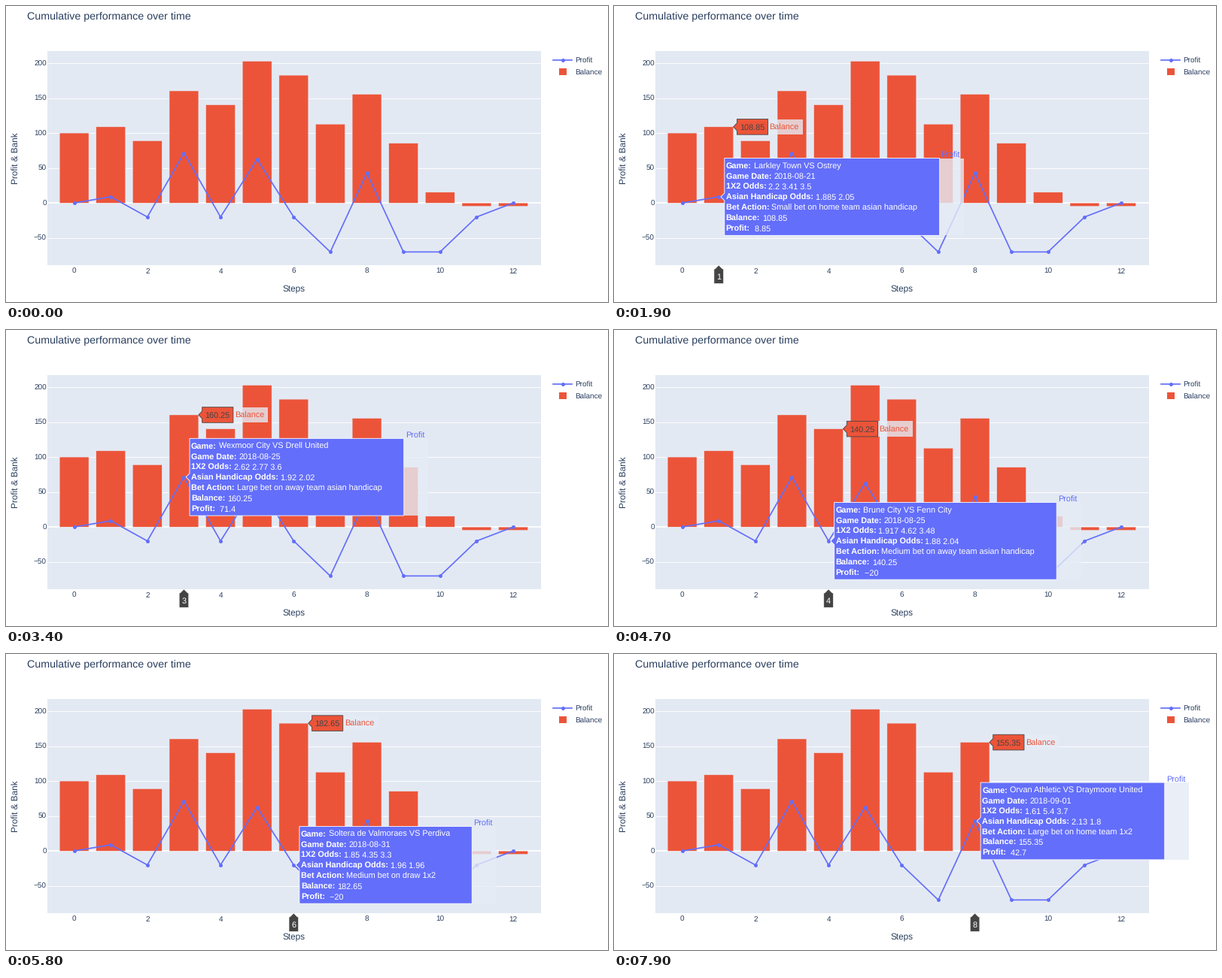
Write a matplotlib script that moves like this. It is 800x394 px and loops after 8 s.

```python
import numpy as np
import matplotlib.pyplot as plt
from matplotlib.animation import FuncAnimation
from matplotlib.patches import Polygon, Rectangle

plt.rcParams["font.family"] = "Liberation Sans"
plt.rcParams["text.hinting"] = "none"

W, H, DPI = 800, 394, 100
FRAMES, INTERVAL = 80, 100

INK, PLOT_BG = "#2a3f5f", "#e3e9f3"
RED, BLUE, DARK = "#ec5439", "#636efa", "#444444"
TICK, AXIS, HOVER, TITLE = 10.0, 11.7, 10.86, 14.2  # font sizes in pixels
LINE_STEP = 13.9

profit = np.array([0, 8.85, -20, 71.4, -20, 62.4, -20, -70, 42.7, -70, -70, -20, 0])
balance = np.round(100 + np.cumsum(profit), 2)

# game, date, 1X2 odds, asian handicap odds, bet action
BETS = [
    (" VS", "", "", " ", ""),
    ("Larkley Town VS Ostrey", "2018-08-21", "2.2 3.41 3.5", "1.885 2.05",
     "Small bet on home team asian handicap"),
    ("Stanmarsh Rovers VS Kelding", "2018-08-22", "1.98 4.51 3.36", "1.9 2.02",
     "Medium bet on home team asian handicap"),
    ("Wexmoor City VS Drell United", "2018-08-25", "2.62 2.77 3.6", "1.92 2.02",
     "Large bet on away team asian handicap"),
    ("Brune City VS Fenn City", "2018-08-25", "1.917 4.62 3.48", "1.88 2.04",
     "Medium bet on away team asian handicap"),
    ("Corvane VS Ulmeda", "2018-08-26", "1.95 4.12 3.4", "1.94 1.98",
     "Medium bet on away team 1x2"),
    ("Soltera de Valmoraes VS Perdiva", "2018-08-31", "1.85 4.35 3.3", "1.96 1.96",
     "Medium bet on draw 1x2"),
    ("Garrow Town VS Pelmont", "2018-09-01", "2.3 3.2 3.35", "1.99 1.93",
     "Large bet on away team asian handicap"),
    ("Orvan Athletic VS Draymoore United", "2018-09-01", "1.61 5.4 3.7", "2.13 1.8",
     "Large bet on home team 1x2"),
]
LABELS = ["Game:", "Game Date:", "1X2 Odds:", "Asian Handicap Odds:",
          "Bet Action:", "Balance:", "Profit:"]

# first frame at which each step is hovered
HOVER_STARTS = [9, 15, 21, 30, 37, 48, 55, 65, 74]

fig = plt.figure(figsize=(W / DPI, H / DPI), dpi=DPI, facecolor="white")
ax = fig.add_axes([0, 0, 1, 1])
ax.set_xlim(0, W)
ax.set_ylim(H, 0)
ax.axis("off")
renderer = fig.canvas.get_renderer()


def pt(px):
    return px * 72 / DPI


def px_x(step):
    return 90.6 + 48.62 * step


def px_y(value):
    return 262.2 - 0.931 * value


# One shared zorder everywhere: artists stack in the order they are added.
def text(x, y, s, size, color=INK, **kw):
    return ax.text(x, y, s, fontsize=pt(size), color=color, va="baseline",
                   zorder=1, **kw)


def line(x, y, **kw):
    ax.plot(x, y, zorder=1, **kw)


def rect(x0, y0, x1, y1, color, **kw):
    kw = {"lw": 0, **kw}
    return ax.add_patch(Rectangle((x0, y0), x1 - x0, y1 - y0, fc=color,
                                  zorder=1, **kw))


def polygon(points, fill, edge, lw):
    return ax.add_patch(Polygon(points, fc=fill, ec=edge, lw=pt(lw),
                                joinstyle="miter", zorder=1))


def width(s, weight="normal"):
    """Advance width in the hover font, trailing spaces included."""
    zoom = 10  # measured large to avoid pixel rounding

    def extent(t):
        probe = text(0, 0, t, HOVER * zoom, weight=weight)
        w = probe.get_window_extent(renderer).width
        probe.remove()
        return w / zoom
    return extent(s + "|") - extent("|")


def signed(value):
    return f"{value:g}".replace("-", "\u2212")


def draw_chart():
    rect(54.5, 60, 710.5, 345, PLOT_BG)
    for v in range(-50, 201, 50):
        y = px_y(v)
        line([54.5, 710.5], [y, y], color="white", lw=pt(1.8 if v == 0 else 0.9),
             solid_capstyle="butt")
        text(53.7, y + 3.6, signed(v), TICK, ha="right")
    for step in range(0, 13, 2):
        text(px_x(step), 355.6, str(step), TICK, ha="center")

    for step, b in enumerate(balance):
        x = px_x(step)
        rect(x - 19.4, px_y(0), x + 19.4, px_y(b), RED, ec=PLOT_BG, lw=pt(0.4),
             snap=False)
    dots = dict(color=BLUE, lw=pt(1.7), marker="o", ms=pt(5), mew=0)
    line(px_x(np.arange(13)), px_y(profit), **dots)

    text(28.4, 18, "Cumulative performance over time", TITLE)
    text(382.5, 379.4, "Steps", AXIS, ha="center")
    text(16, 202.3, "Profit & Bank", AXIS, ha="center", rotation=90,
         rotation_mode="anchor")

    line([727, 739.7, 752.3], [72, 72, 72], markevery=[1], **dots)
    rect(735, 82.5, 745, 92.3, RED)
    text(756.3, 75.3, "Profit", TICK)
    text(756.3, 91.1, "Balance", TICK)


def callout(tip, cy, x0, x1, half, fill, edge):
    """Box with a small arrow pointing left."""
    return polygon([(tip, cy), (x0, cy - 5), (x0, cy - half), (x1, cy - half),
                    (x1, cy + half), (x0, cy + half), (x0, cy + 5)],
                   fill, edge, 0.85)


def name_tag(name, x, cy, half, baseline, color):
    w = width(name) + 7.2
    return [rect(x, cy - half, x + w, cy + half, "#e5ecf6", alpha=0.8),
            text(x + 1.9, baseline, name, HOVER, color)]


def axis_label(step):
    x = px_x(step)
    points = [(x, 345), (x + 5, 350), (x + 6.3, 350), (x + 6.3, 369.5),
              (x - 6.3, 369.5), (x - 6.3, 350), (x - 5, 350)]
    return [polygon(points, DARK, "white", 0.6),
            text(x, 363.6, str(step), HOVER, "white", ha="center")]


def balance_label(step):
    tip, cy = px_x(step) + 19.4, px_y(balance[step])
    value = f"{balance[step]:g}"
    x0 = tip + 4.8
    x1 = x0 + width(value) + 8
    return (name_tag("Balance", x1, cy, 10.3, cy + 3.9, RED)
            + [callout(tip, cy, x0, x1, 10.3, RED, DARK),
               text((x0 + x1) / 2 - 0.5, cy + 3.9, value, HOVER, DARK, ha="center")])


def profit_label(step):
    x, cy = px_x(step), px_y(profit[step])
    x0, half = x + 7.6, 51.4
    values = list(BETS[step]) + [str(balance[step]), " " + signed(profit[step])]
    starts = [width(label + " ", "bold") for label in LABELS]
    x1 = x0 + 31.5 + max(s + width(v) for s, v in zip(starts, values))
    parts = name_tag("Profit", x1, cy, half, cy - half - 0.4, BLUE)
    parts.append(callout(x + 2.7, cy, x0, x1, half, BLUE, "white"))
    for i, (label, start, value) in enumerate(zip(LABELS, starts, values)):
        y = cy + 4.1 + (i - 3) * LINE_STEP
        parts.append(text(x0 + 1.9, y, label, HOVER, "white", weight="bold"))
        parts.append(text(x0 + 1.9 + start, y, value, HOVER, "white"))
    return parts


draw_chart()
hovers = [axis_label(s) + balance_label(s) + profit_label(s) for s in range(len(BETS))]


def update(frame):
    current = sum(frame >= start for start in HOVER_STARTS) - 1
    for step, parts in enumerate(hovers):
        for part in parts:
            part.set_visible(step == current)
    return []


anim = FuncAnimation(fig, update, frames=FRAMES, interval=INTERVAL,
                     init_func=lambda: update(0), repeat=True, repeat_delay=0)
plt.show()
```
